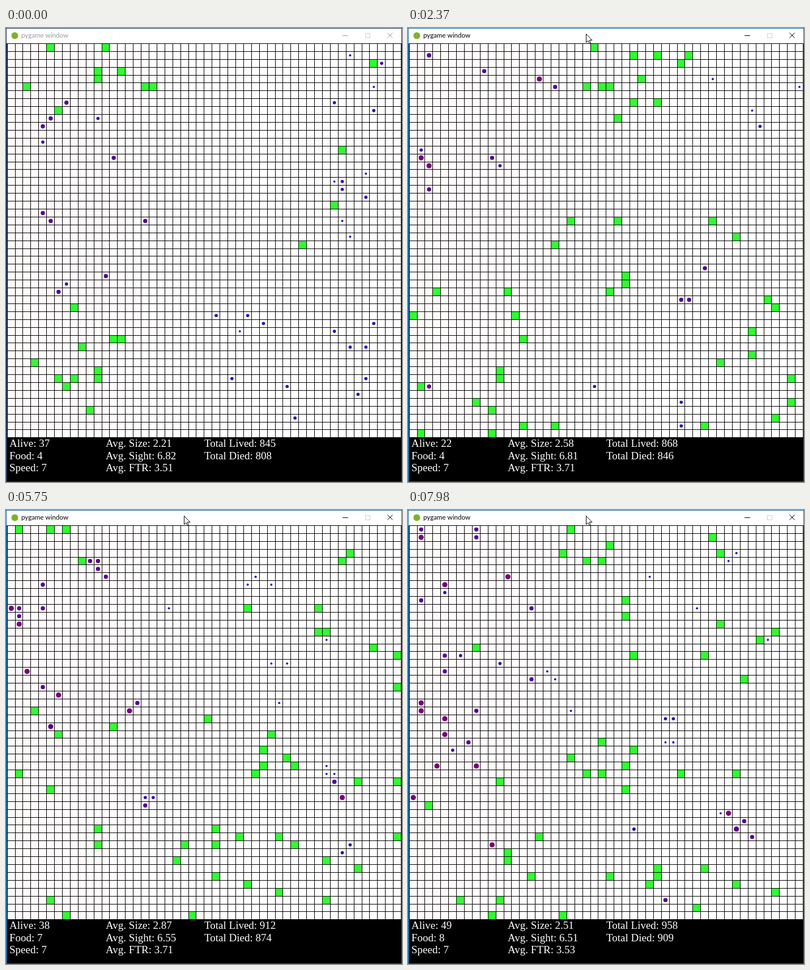
Recreate the animation shown at these times as an HTML page with a canvas. Size 699 by 801 pixels, loop 8 s.

```html
<!DOCTYPE html>
<html lang="en">
<head>
<meta charset="utf-8">
<title>pygame window</title>
<style>
  html, body { margin: 0; width: 100%; height: 100%; overflow: hidden; background: #000; }
  canvas { display: block; width: 699px; height: 801px; }
</style>
</head>
<body>
<canvas id="stage" width="699" height="801"></canvas>
<script>
const ctx = document.getElementById('stage').getContext('2d');
const LOOP = 8000, TICK = 76.8, STEPS = 105;
const CELLS = 50, PITCH = 13.91, LEFT = 2.1, TOP = 27.4;

// Key points of the read-outs; values run straight between them.
const COLUMNS = ['step', 'food', 'size', 'sight', 'ftr', 'lived', 'died', 'squares'];
const STATS = [
  [0, 4, 2.21, 6.82, 3.51, 845, 808, 25],
  [19, 4, 2.75, 6.95, 3.85, 859, 839, 38],
  [43, 5, 2.42, 6.67, 3.58, 876, 853, 47],
  [61, 6, 2.48, 6.55, 3.59, 895, 866, 58],
  [75, 7, 2.87, 6.55, 3.71, 912, 874, 46],
  [86, 7, 2.58, 6.18, 3.44, 931, 881, 41],
  [104, 8, 2.51, 6.51, 3.53, 958, 909, 45]
];

// Opening regions in cells: corner, extent, number of members.
const FOOD_REGIONS = [
  { x: 1, y: 0, w: 18, h: 9, count: 10 },
  { x: 2, y: 37, w: 12, h: 11, count: 9 },
  { x: 3, y: 0, w: 45, h: 42, count: 6 }
];
const HERD_REGIONS = [
  { x: 4, y: 7, w: 14, h: 25, count: 12, size: 3 },
  { x: 41, y: 1, w: 8, h: 25, count: 12, size: 2 },
  { x: 26, y: 34, w: 23, h: 15, count: 13, size: 2 }
];

let seed = 4711;
const rand = () => {
  seed = (seed * 1664525 + 1013904223) >>> 0;
  return seed / 4294967296;
};
const pick = n => Math.floor(rand() * n);
const clamp = (v, lo, hi) => Math.max(lo, Math.min(hi, v));

function statsAt(step) {
  const i = Math.max(1, STATS.findIndex(row => row[0] >= step));
  const a = STATS[i - 1], b = STATS[i];
  const k = (step - a[0]) / (b[0] - a[0]);
  const s = Object.fromEntries(COLUMNS.map((name, j) => [name, a[j] + (b[j] - a[j]) * k]));
  s.food = Math.floor(s.food + 1e-6);
  for (const name of ['lived', 'died', 'squares']) s[name] = Math.round(s[name]);
  return s;
}

const scatter = (regions, make) => regions.flatMap(r =>
  Array.from({ length: r.count }, () => make(r.x + pick(r.w), r.y + pick(r.h), r.size)));
const newCreature = (x, y, size) => ({
  x: clamp(x, 0, CELLS - 1), y: clamp(y, 0, CELLS - 1), size: clamp(size, 1, 4), turn: pick(4)
});
const newFood = (x, y, step) => ({ x, y, end: step + 12 + pick(35) });
const meanSize = herd => herd.reduce((sum, c) => sum + c.size, 0) / herd.length;

function nearest(c, foods) {
  let best = null, reach = 8;
  for (const f of foods) {
    const d = Math.abs(f.x - c.x) + Math.abs(f.y - c.y);
    if (d < reach) { reach = d; best = f; }
  }
  return best;
}

function move(c, foods) {
  const goal = nearest(c, foods);
  if (goal) {
    const dx = goal.x - c.x, dy = goal.y - c.y;
    if (Math.abs(dx) > Math.abs(dy)) c.x += Math.sign(dx);
    else c.y += Math.sign(dy);
    return;
  }
  if (rand() < 0.15) c.turn = pick(4);
  const x = c.x + [1, 0, -1, 0][c.turn], y = c.y + [0, 1, 0, -1][c.turn];
  if (x < 0 || y < 0 || x >= CELLS || y >= CELLS) c.turn = (c.turn + 2) % 4;
  else { c.x = x; c.y = y; }
}

function breed(herd, wanted) {
  const parent = herd[pick(herd.length)];
  const drift = rand() < 0.4 ? Math.sign(wanted - meanSize(herd)) : 0;
  herd.push(newCreature(parent.x + pick(3) - 1, parent.y + 1, parent.size + drift));
}

function cull(herd, wanted) {
  const a = pick(herd.length), b = pick(herd.length);
  const small = herd[a].size < herd[b].size ? a : b;
  herd.splice(meanSize(herd) < wanted ? small : a + b - small, 1);
}

function simulate() {
  const herd = scatter(HERD_REGIONS, (x, y, size) => newCreature(x, y, size - (rand() < 0.3)));
  let foods = scatter(FOOD_REGIONS, (x, y) => newFood(x, y, 0));
  const history = [];
  let last = statsAt(0);

  for (let step = 0; step < STEPS; step++) {
    const now = statsAt(step);
    if (step) {
      for (const c of herd) if (rand() < 0.8) move(c, foods);
      foods = foods.filter(f => f.end > step && !herd.some(c => c.x === f.x && c.y === f.y));
      for (let n = last.lived; n < now.lived; n++) breed(herd, now.size);
      for (let n = last.died; n < now.died; n++) cull(herd, now.size);
      while (foods.length < now.squares) foods.push(newFood(pick(CELLS), pick(CELLS), step));
    }
    history.push({ now, foods, herd: herd.map(c => ({ ...c })) });
    foods = [...foods];
    last = now;
  }
  return history;
}

const history = simulate();
const edgeX = i => Math.floor(LEFT + i * PITCH);
const edgeY = i => Math.floor(TOP + i * PITCH);

function box(color, x, y, w, h) {
  ctx.fillStyle = color;
  ctx.fillRect(x, y, w, h);
}

function disc(color, x, y, r) {
  ctx.fillStyle = color;
  ctx.beginPath();
  ctx.arc(x, y, r, 0, Math.PI * 2);
  ctx.fill();
}

function drawWindow(active) {
  box(active ? '#1769aa' : '#203c58', 0, 0, 699, 801);
  box('#fff', 1, 1, 697, 26);
  box('#000', 2, 722, 696, 78);
  disc('#7db32a', 15.5, 13.5, 6);

  const ink = active ? '#000' : '#999';
  ctx.fillStyle = ink;
  ctx.font = '11.6px Lato, "Open Sans", sans-serif';
  ctx.fillText('pygame window', 27, 17);

  ctx.lineWidth = 1;
  ctx.strokeStyle = '#d0d0d0';
  ctx.strokeRect(634.5, 9.5, 8, 8);
  box(ink, 594, 13, 10, 1);
  ctx.strokeStyle = ink;
  ctx.beginPath();
  ctx.moveTo(673.5, 8.5); ctx.lineTo(682.5, 17.5);
  ctx.moveTo(682.5, 8.5); ctx.lineTo(673.5, 17.5);
  ctx.stroke();
}

function drawField({ foods, herd }) {
  const ground = ctx.createLinearGradient(LEFT, 0, 698, 0);
  ground.addColorStop(0, '#fffafa');
  ground.addColorStop(0.6, '#fff');
  box(ground, 2, 27, 696, 695);

  for (const f of foods) {
    const x = edgeX(f.x), y = edgeY(f.y);
    box('#32fa32', x, y, edgeX(f.x + 1) - x, edgeY(f.y + 1) - y);
  }
  for (let i = 0; i <= CELLS; i++) {
    box('#000', edgeX(i), 27, 1, 695);
    box('#000', 2, edgeY(i), 696, 1);
  }
  for (const c of herd) {
    const tint = `rgb(${33 * c.size - 13}, 0, ${230 - 28 * c.size})`;
    disc(tint, LEFT + (c.x + 0.5) * PITCH + 0.3, TOP + (c.y + 0.5) * PITCH, 1 + 0.9 * c.size);
  }
}

function drawStats(s) {
  const columns = [
    [6, `Alive: ${s.lived - s.died}`, `Food: ${s.food}`, 'Speed: 7'],
    [176, `Avg. Size: ${s.size.toFixed(2)}`, `Avg. Sight: ${s.sight.toFixed(2)}`,
      `Avg. FTR: ${s.ftr.toFixed(2)}`],
    [350, `Total Lived: ${s.lived}`, `Total Died: ${s.died}`]
  ];
  ctx.fillStyle = '#fff';
  ctx.font = '19px "Liberation Serif", serif';
  for (const [x, ...lines] of columns) {
    lines.forEach((line, i) => ctx.fillText(line, x, 739 + i * 21.7));
  }
}

function drawCursor() {
  ctx.save();
  ctx.translate(314.5, 10.5);
  ctx.fillStyle = '#fff';
  ctx.strokeStyle = '#000';
  const arrow = new Path2D('M0 0V15L3.5 12L6 17L8 16L5.7 11H10.5Z');
  ctx.fill(arrow);
  ctx.stroke(arrow);
  ctx.restore();
}

let shown = -1;
function frame() {
  const time = performance.now() % LOOP;
  const step = Math.min(STEPS - 1, Math.floor((time + 11) / TICK));
  if (step !== shown) {
    shown = step;
    drawWindow(step >= 21);
    drawField(history[step]);
    drawStats(history[step].now);
    if (step >= 17) drawCursor();
  }
  requestAnimationFrame(frame);
}
frame();
</script>
</body>
</html>
```
